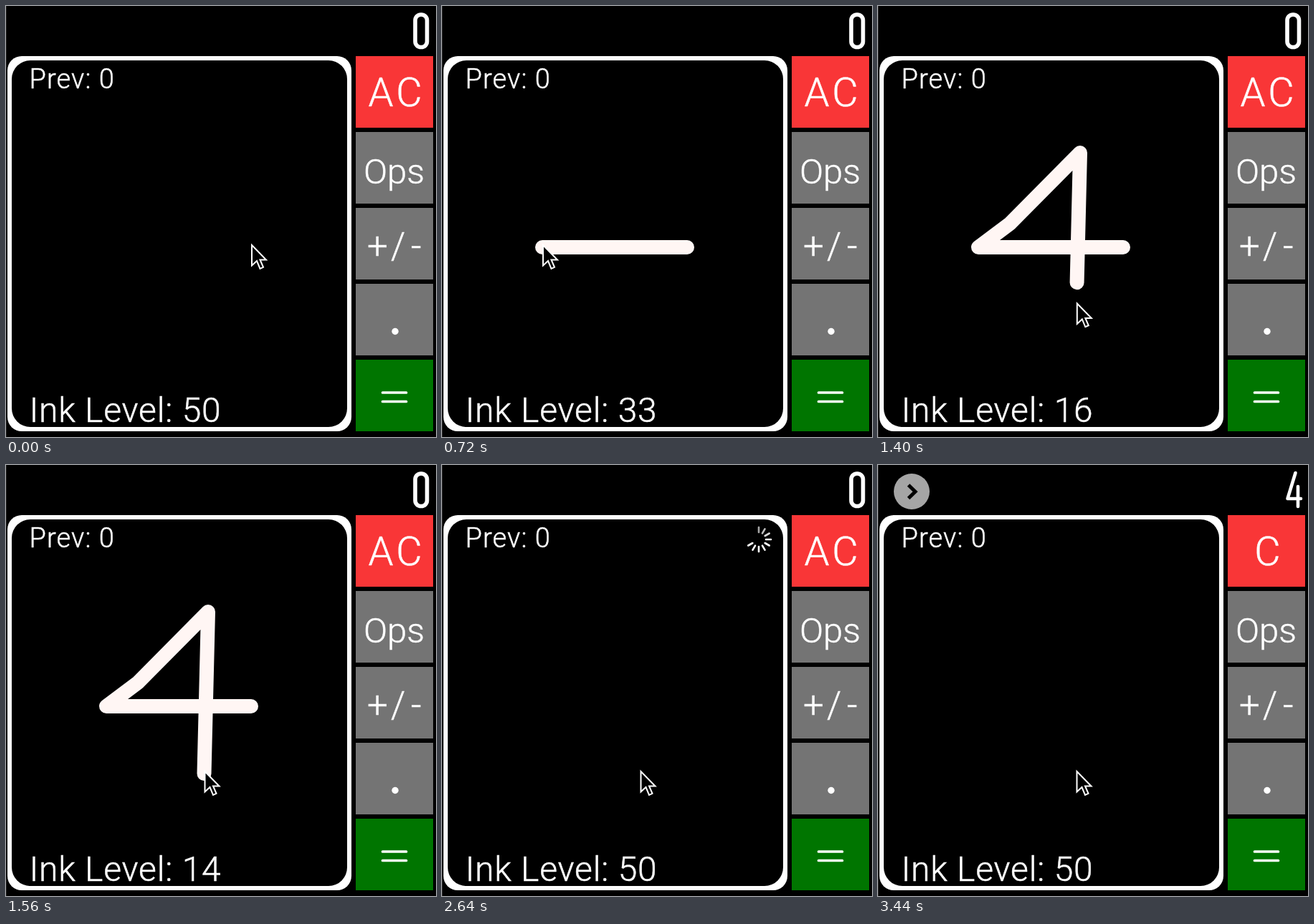
Write an HTML page that moves like this. It is 600 px wide and 602 px high and loops after 4120 ms.

```html
<!DOCTYPE html>
<html lang="en">
<head>
<meta charset="utf-8">
<title>Handwriting calculator</title>
<style>
  html, body { margin: 0; height: 100%; overflow: hidden; background: #000; }
  svg { display: block; width: 100vw; height: 100vh; }
  text { font: 300 48px Roboto, Lato, sans-serif; fill: #fff; stroke: #fff; stroke-width: .5px; }
  .mid { text-anchor: middle; }
  .line { fill: none; stroke: #fff; stroke-linecap: round; stroke-linejoin: round; }
</style>
</head>
<body>
<svg viewBox="0 0 600 602">
  <path d="M.5 0V602" stroke="#202020"/>
  <rect x="2" y="70" width="480" height="524" rx="20" fill="#fff"/>
  <rect x="8" y="76" width="468" height="512" rx="26"/>

  <g id="buttons"></g>
  <text id="allClear" class="mid" x="545" y="140" style="font-size:56px;letter-spacing:4px">AC</text>
  <text id="clear" class="mid" x="543.5" y="140" style="font-size:56px">C</text>
  <text class="mid" x="541.5" y="247.5" style="font-size:49px">Ops</text>
  <text x="504 537 565" y="353" style="font-size:51px">+/-</text>
  <circle cx="543" cy="454.5" r="4.7" fill="#fff"/>
  <path class="line" d="M525.5 540H558.5M525.5 552.5H558.5" stroke-width="3.7"/>

  <rect id="zero" class="line" x="571" y="12" width="16.5" height="45.5" rx="8" stroke-width="5.6"/>
  <path id="four" class="line" d="M582.5 11 571.5 47H590M586 30V58" stroke-width="4.6"/>
  <g id="next">
    <circle cx="47" cy="37" r="25" fill="#a5a5a5"/>
    <path d="M42.5 28 52 37.3 42.5 46.5" fill="none" stroke="#000" stroke-width="5"/>
  </g>

  <text x="32.5" y="115" style="font-size:38px;letter-spacing:1.1px">Prev: 0</text>
  <text id="ink" x="32.5" y="581" style="letter-spacing:.8px"></text>
  <g id="spinner" class="line" stroke-width="2.6" transform="translate(442 104)"></g>
  <polyline id="stroke" class="line" style="stroke:#fff6f4" stroke-width="20"/>
  <path id="cursor" d="M1 1V29.5L8 23 12.5 33.8 17 31.8 12.5 21.5H21Z" fill="#000" stroke="#fff" stroke-width="2"/>
</svg>
<script>
const LOOP = 4120, STEP = 40, LAG = 40;
const DRAW = 240, RECOGNISE = 1960, RESULT = 2680, FADE = 320;
const SPOKES = 12, SPOKE_MS = 1000 / SPOKES, FULL_INK = 50;

// pen position and ink left; the pen rests between moves
const origin = [342, 337, FULL_INK];
const moves = [
  { start: 200, end: 680, to: [140, 337, 33] },
  { start: 760, end: 880, to: [184, 304, 28] },
  { start: 880, end: 1000, to: [282, 205, 20] },
  { start: 1160, end: 1440, to: [276.5, 431, 14] }
];

const $ = id => document.getElementById(id);
const show = (id, alpha) => $(id).setAttribute('opacity', +alpha);
const progress = (t, start, end) => Math.min(1, Math.max(0, (t - start) / (end - start)));
const smooth = u => u * u * (3 - 2 * u);

// corners passed so far, ending at the pen itself
function trail(t) {
  const points = [origin];
  for (const { start, end, to } of moves) {
    if (t < start) break;
    const from = points[points.length - 1];
    const u = smooth(progress(t, start, end));
    points.push(to.map((v, i) => from[i] + (v - from[i]) * u));
  }
  return points;
}

['#f93637', '#747474', '#747474', '#747474', '#007500'].forEach((fill, i) => {
  $('buttons').insertAdjacentHTML('beforeend',
    `<rect x="488" y="${70 + 106 * i}" width="108" height="100" fill="${fill}"/>`);
});
for (let i = 0; i < SPOKES; i++) {
  $('spinner').insertAdjacentHTML('beforeend',
    `<path d="M0 -10V-17" transform="rotate(${i * 360 / SPOKES})" opacity="${Math.min(1, .65 + .1 * i)}"/>`);
}
const spokes = [...$('spinner').children];

function render(t) {
  const [x, y] = trail(t).pop();
  $('cursor').setAttribute('transform', `translate(${x} ${y - 4})`);

  const drawing = t >= DRAW && t < RECOGNISE;
  const points = trail(t - LAG);
  const ink = points[points.length - 1][2];
  $('stroke').setAttribute('points', points.map(p => p[0] + ',' + p[1]).join(' '));
  show('stroke', drawing);
  $('ink').textContent = 'Ink Level: ' + (drawing ? Math.ceil(ink) : FULL_INK);

  const head = Math.floor((t - RECOGNISE) / SPOKE_MS);
  spokes.forEach((s, i) => s.setAttribute('visibility', i <= head ? 'visible' : 'hidden'));
  show('spinner', t >= RECOGNISE && t < RESULT);

  const done = t >= RESULT;
  const fade = progress(t, RESULT, RESULT + FADE);
  show('zero', !done);
  show('four', done);
  show('next', fade);
  show('clear', fade);
  show('allClear', 1 - fade);
}

const start = performance.now();
function tick() {
  const t = (performance.now() - start) % LOOP;
  render(Math.floor(t / STEP) * STEP);
  requestAnimationFrame(tick);
}
tick();
</script>
</body>
</html>
```
